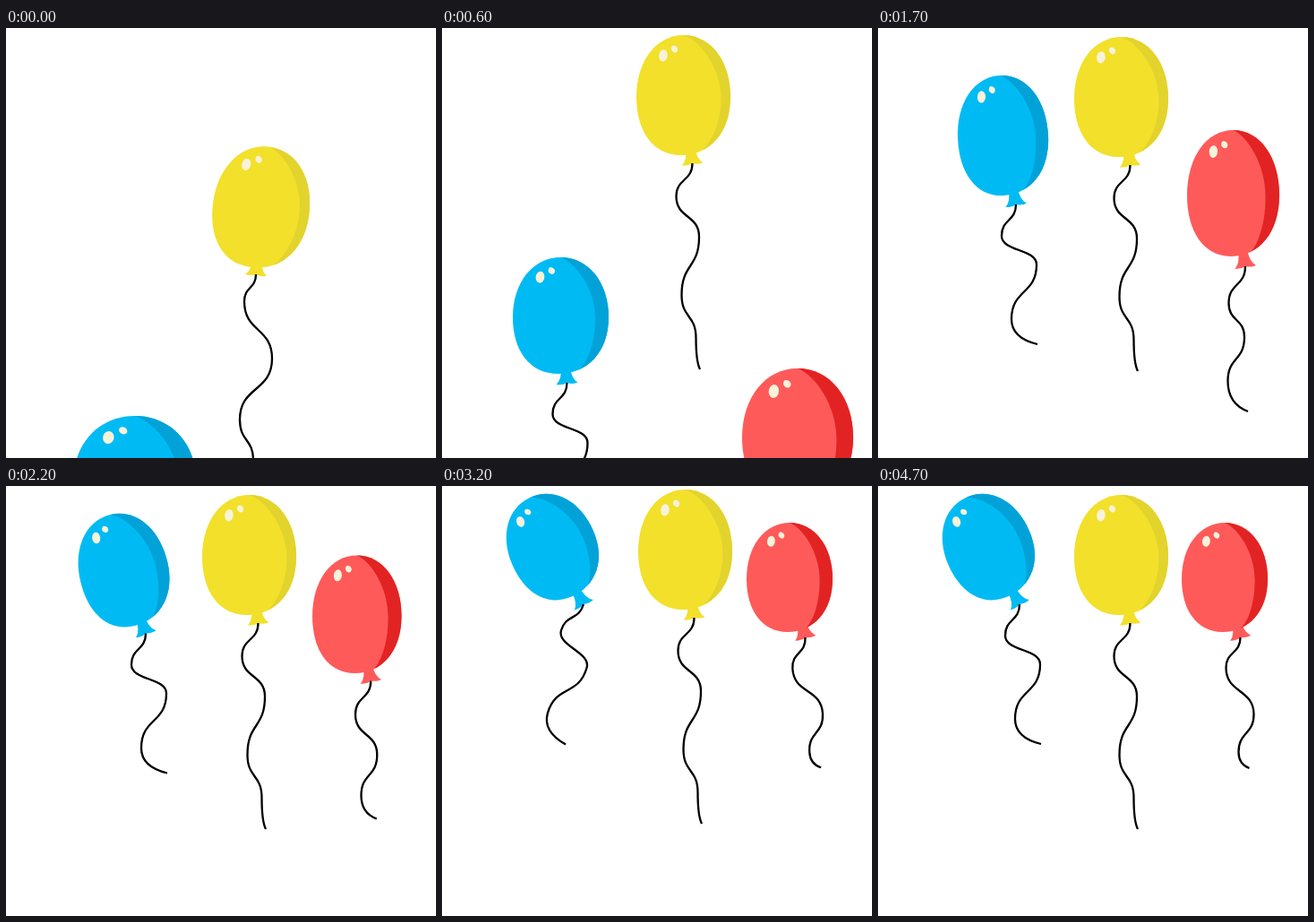
Recreate the animation shown at these times as an HTML page with a canvas. Size 480 by 480 pixels, loop 5.2 s.

```html
<!DOCTYPE html>
<html lang="en">
<head>
<meta charset="utf-8">
<title>Balloons</title>
<style>
  html, body { margin: 0; width: 100%; height: 100%; overflow: hidden; background: #fff; }
  canvas { display: block; }
</style>
</head>
<body>
<canvas id="stage" width="480" height="480"></canvas>
<script>
const ctx = document.getElementById('stage').getContext('2d');
const LOOP = 5200, QUICK = 200, SLOW = 500, QUICK_STEPS = 6, REST_STEP = 9;

// Shapes every balloon shares; body and shade fill a box from -1 to 1.
const BODY = new Path2D('M-1 .03C-1-.57-.58-1 0-1S1-.57 1 .03 .55 1-.05 1-1 .6-1 .03Z');
const KNOT = new Path2D('M-6-22Q-6-5-14 1Q-6 3 0 0Q8 3 14 1Q6-5 6-22Z');
const shadeShape = edge =>
  new Path2D(`M0-1C${edge * .45}-.9 ${edge}-.45 ${edge} .05S.5 .9 .27 1V2H2V-2H0Z`);

// Bends of a string as x, y from its upper end; the last one is the tail.
const LOOSE = [-13, 30, 18, 94, -18, 162, -3, 208, 5, 240];
const TAUT = [-18, 37, 7.5, 82, -12, 147, 4, 195, 8.5, 230];
const CURLED = [-16, 35, 23, 67, -5, 128, 24, 156];
const LONG = [-18.5, 41, -1, 79, -19.5, 128, 3, 162];
const SHORT = [-16, 34, 15, 86, -2, 128, 10, 146];

// Pose: centre x, y, width, height, string x, y, tilt, bends.
// position: place among the poses at a step; sway: x, y, string swing while resting.
const rise = step => (step - 3) / 2;
const balloons = [
  { fill: '#00bbf3', dark: '#02a2d8', edge: .72, sway: [0, 0, 16],
    position: step => Math.min(4, rise(step) + 1),
    poses: [
      [140, 443, 127, 138, 144, 520, 0, ...CURLED],
      [132.5, 321, 107, 130, 139.5, 396, 0, ...CURLED],
      [147, 240.5, 116, 151, 147.5, 326, 0, ...CURLED],
      [139.5, 120, 101, 134, 154, 197, -3, ...CURLED],
      [123, 67.5, 98, 120, 158, 132, -24, ...CURLED]
    ] },
  { fill: '#f2e02b', dark: '#e3d32d', edge: .8, sway: [0, -6, 0],
    position: step => Math.min(2, step) + Math.max(0, Math.min(1, (step - 5) / 2)),
    poses: [
      [285, 200, 108, 136, 279, 275, 8, ...LOOSE],
      [293, 68, 104, 136, 297, 143, 0, ...LOOSE],
      [269.5, 75, 105, 134, 279.5, 151, 0, ...TAUT],
      [271.5, 77, 105, 134, 281.5, 153, 0, ...TAUT]
    ] },
  { fill: '#ff5a5a', dark: '#e22323', edge: .7, sway: [1, 0, -3],
    position: step => Math.min(3, rise(step)),
    poses: [
      [397, 455, 124, 150, 402, 540, 0, ...LONG],
      [396, 322, 114, 152, 402, 405, 0, ...LONG],
      [396.5, 184.5, 103, 141, 410, 266, 0, ...LONG],
      [387, 102, 96, 122, 404.5, 169, 0, ...SHORT]
    ] }
];

const rad = degrees => degrees * Math.PI / 180;

function inFrame(x, y, angle, draw) {
  ctx.save();
  ctx.translate(x, y);
  ctx.rotate(angle);
  draw();
  ctx.restore();
}

function poseAt(poses, position) {
  const i = Math.max(0, Math.min(poses.length - 2, Math.floor(position)));
  return poses[i].map((v, n) => v + (poses[i + 1][n] - v) * (position - i));
}

// The string runs straight down at each bend and sweeps into its tail.
function drawString(bends) {
  const tail = bends.length - 2;
  let x = 0, y = 0;
  ctx.beginPath();
  ctx.moveTo(x, y);
  for (let i = 0; i <= tail; i += 2) {
    const u = bends[i], v = bends[i + 1], reach = (v - y) * .55;
    if (i < tail) ctx.bezierCurveTo(x, y + reach, u, v - reach, u, v);
    else ctx.quadraticCurveTo(x, y + (v - y) * .75, u, v);
    x = u;
    y = v;
  }
  ctx.lineWidth = 2.3;
  ctx.strokeStyle = '#000';
  ctx.stroke();
}

function drawShine(x, y, rx, ry) {
  ctx.beginPath();
  ctx.ellipse(x, y, rx, ry, .4, 0, 2 * Math.PI);
  ctx.fillStyle = '#f8f2da';
  ctx.fill();
}

function drawBody(width, height, { fill, dark, edge }) {
  ctx.scale(width / 2, height / 2);
  ctx.fillStyle = fill;
  ctx.fill(BODY);
  ctx.clip(BODY);
  ctx.fillStyle = dark;
  ctx.fill(shadeShape(edge));
  drawShine(-.43, -.66, .09, .1);
  drawShine(-.19, -.77, .07, .055);
}

function drawBalloon(balloon, step) {
  const swaying = step > REST_STEP && step % 2 === 0;
  const [dx, dy, swing] = swaying ? balloon.sway : [0, 0, 0];
  const [x, y, width, height, endX, endY, tilt, ...bends] =
    poseAt(balloon.poses, balloon.position(step));
  const lean = Math.atan2(x - endX, endY - y);
  inFrame(dx, dy, 0, () => {
    inFrame(endX, endY, lean, () => {
      ctx.scale(.85, .85);
      ctx.fillStyle = balloon.fill;
      ctx.fill(KNOT);
    });
    inFrame(endX, endY, rad(swing), () => drawString(bends));
    inFrame(x, y, rad(tilt), () => drawBody(width, height, balloon));
  });
}

function stepAt(t) {
  const slowStart = QUICK * QUICK_STEPS;
  return t < slowStart ? Math.floor(t / QUICK) : QUICK_STEPS + Math.floor((t - slowStart) / SLOW);
}

function frame() {
  const step = stepAt(performance.now() % LOOP);
  ctx.clearRect(0, 0, 480, 480);
  balloons.forEach(balloon => drawBalloon(balloon, step));
  requestAnimationFrame(frame);
}
frame();
</script>
</body>
</html>
```
